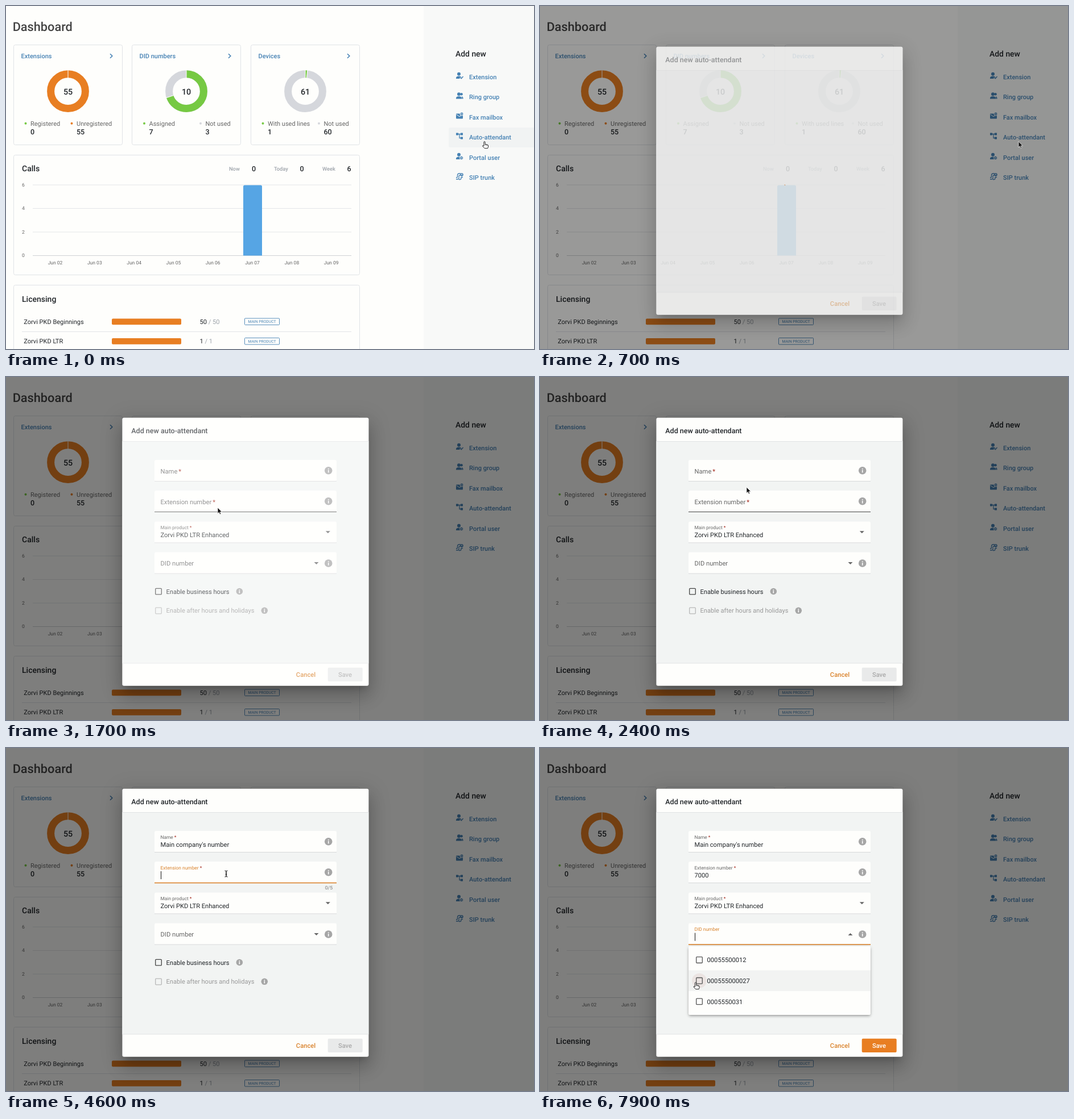
An HTML page for the animation above (8000 ms loop, 928x604 px).

```html
<!DOCTYPE html>
<html lang="en">
<head>
<meta charset="utf-8">
<title>Dashboard</title>
<style>
  html, body { margin: 0; width: 100%; height: 100%; overflow: hidden; background: #fefefc; }
  svg { display: block; width: 928px; height: 604px; font-family: Roboto, sans-serif; text-rendering: geometricPrecision; }
</style>
</head>
<body>
<svg id="stage" viewBox="0 0 928 604"></svg>
<script>
const LOOP = 8000, TICK = 100;
const INK = '#212529', GREY = '#666', PALE = '#9da3aa', BLUE = '#4682b4', PAPER = '#fefefc', SIDE = '#f8f9f8';
const ORANGE = '#e87e22', ACCENT = '#d9822b', GREEN = '#76c943', SILVER = '#d5d7dc', BORDER = '#e0e3e7';

const stage = document.getElementById('stage');
const pen = document.createElement('canvas').getContext('2d');
const clamp = v => Math.max(0, Math.min(1, v));

// Piecewise linear value from [time, value] pairs
function track(t, keys) {
  if (t <= keys[0][0]) return keys[0][1];
  for (let i = 1; i < keys.length; i++) {
    const [t0, a] = keys[i - 1], [t1, b] = keys[i];
    if (t < t1) return a + (b - a) * (t - t0) / (t1 - t0);
  }
  return keys.at(-1)[1];
}

const text = (x, y, str, size, fill = INK, weight = 400, anchor = 'start') =>
  `<text x="${x}" y="${y}" font-size="${size}" fill="${fill}" font-weight="${weight}" text-anchor="${anchor}">${str}</text>`;
const rect = (x, y, w, h, fill, r = 0, extra = '') =>
  `<rect x="${x}" y="${y}" width="${w}" height="${h}" rx="${r}" fill="${fill}" ${extra}/>`;
const circle = (x, y, r, fill, extra = '') =>
  `<circle cx="${x}" cy="${y}" r="${r}" fill="${fill}" ${extra}/>`;
const path = (d, stroke, width = 1, fill = 'none') =>
  `<path d="${d}" fill="${fill}" stroke="${stroke}" stroke-width="${width}"/>`;
const shape = (d, fill) => path(d, 'none', 0, fill);
const at = (x, y, content) => `<g transform="translate(${x} ${y})">${content}</g>`;
const panel = (x, y, w, h) => rect(x + .5, y + .5, w - 1, h - 1, PAPER, 3, `stroke="${BORDER}"`);

// Layers are [offset, blur, spread, alpha]
const shadow = (x, y, w, h, layers) => layers.map(([dy, blur, spread, alpha]) =>
  rect(x - spread, y + dy - spread, w + 2 * spread, h + 2 * spread, '#000', 3,
    `opacity="${alpha}" style="filter:blur(${blur}px)"`)).join('');

// ---- dashboard ----
function donut(x, y, share, color, rest, total) {
  const cut = deg => `<path d="M0-23V-38" stroke="#fff" transform="rotate(${deg})"/>`;
  return at(x, y,
    circle(0, 0, 30.4, 'none', `stroke="${rest}" stroke-width="13"`) +
    circle(0, 0, 30.4, 'none', `stroke="${color}" stroke-width="13" pathLength="100" stroke-dasharray="${share * 100} 100" transform="rotate(-90)"`) +
    cut(0) + (share ? cut(share * 360) : '') + text(0, 5.5, total, 14.3, INK, 500, 'middle'));
}

function card(x, title, total, share, color, rest, legend) {
  return panel(x, 68, 192, 177) + text(x + 13.5, 92, title, 11, BLUE, 500) +
    path(`M${x + 170} 84.2l3.8 3.8l-3.8 3.8`, BLUE, 1.6) +
    donut(x + 96, 150.2, share, color, rest, total) +
    legend.map(([dx, label, value, dot]) =>
      circle(x + dx - 8.5, 206.7, 2, dot) +
      text(x + dx, 211, label, 11, GREY) + text(x + dx, 225.7, value, 12.5, INK, 500)).join('');
}

function calls() {
  let s = panel(13, 262, 609, 212) + text(28, 291, 'Calls', 14, INK, 500);
  [['Now', 392, 0, 432], ['Today', 471, 0, 516.5], ['Week', 556, 6, 599.5]].forEach(([label, x, value, vx]) =>
    s += text(x, 290, label, 9.3, PALE, 500) + text(vx, 290.7, value, 12.5, INK, 500));
  for (let i = 0; i < 4; i++) {
    const y = 315 + i * 41.5;
    s += text(28, y + 2.8, 6 - 2 * i, 8.6, GREY) + path(`M47 ${y}H607`, i < 3 ? '#e4e6e8' : '#cfd2d5');
  }
  s += shape('M417 439.5V318q0-2.5 2.5-2.5h28q2.5 0 2.5 2.5V439.5z', '#56a5e4');
  for (let i = 0; i < 8; i++) s += text(86.5 + i * 69.3, 454.5, 'Jun 0' + (i + 2), 8.5, GREY, 400, 'middle');
  return s;
}

function licensing() {
  const row = (y, name, count) =>
    text(31.3, y + 4, name, 11, INK) + rect(186, y - 5, 122, 10.7, ORANGE, 2) +
    text(340.5, y + 4, `${count} <tspan fill="${PALE}">/ ${count}</tspan>`, 11.1) +
    rect(419.5, y - 5.5, 61, 11.5, 'none', 1, `stroke="${BLUE}" stroke-width=".9"`) +
    text(450, y + 2.5, 'MAIN PRODUCT', 6.8, BLUE, 400, 'middle');
  return panel(13, 491, 609, 130) + text(28, 521, 'Licensing', 14, INK, 500) +
    row(555.5, 'Zorvi PKD Beginnings', 50) + path('M28 573.5H607', '#e2e4e8') + row(590, 'Zorvi PKD LTR', 1);
}

const person = circle(-1, -2.8, 3, BLUE) + shape('M-6 5.5V4.2C-6 1.5-3 .9-1 .9S4 1.5 4 4.2V5.5z', BLUE);
const badge = (x, y) => circle(x, y, 3, BLUE, `stroke="${SIDE}"`) + path(`M${x - 1.5} ${y}h3`, SIDE);
const boxes = list => list.map(([x, y]) => rect(x, y, 4, 4, BLUE)).join('');
const icons = [
  person + path('M1 3.5l2 2l4-5', SIDE, 2.6) + path('M1.5 3.5l1.8 1.8L6.5 1.5', BLUE, 1.4),
  person + circle(3.6, -2.8, 2.2, BLUE) + shape('M4 1q3 1 2.5 4.5h-2z', BLUE),
  rect(-6, -4, 12, 9, BLUE, 1) + path('M-5.5-2.5L0 1.2L5.5-2.5', SIDE) + badge(4, -3.5),
  boxes([[-6, -5.5], [2, -5.5], [2, 1.5]]) + path('M-2-3.5H2M0-3.5V3.5H2', BLUE, 1.3),
  person + badge(3.5, 3),
  path('M-6 5h3q2 0 2-2v-3q0-2 2-2h5M-6 2h1.5q1 0 1-1v-3q0-3 3-3H2M-1 5.5h2q2 0 2-2.5V1.5H6', BLUE, 1.3) +
    circle(4, -3, 2, 'none', `stroke="${BLUE}" stroke-width="1.5"`)
];

function sidebar(hovered) {
  const items = ['Extension', 'Ring group', 'Fax mailbox', 'Auto-attendant', 'Portal user', 'SIP trunk'];
  return rect(734, 0, 194, 604, SIDE) + (hovered ? rect(778, 214, 160, 35, '#f1f3f3', 3) : '') +
    text(790, 88.7, 'Add new', 13.9, INK, 500) +
    items.map((label, i) => {
      const y = 122.5 + i * 35.5;
      return at(797, y, icons[i]) + text(814, y + 6.4, label, 11, BLUE, 500);
    }).join('');
}

const dashboard = text(11.7, 44.3, 'Dashboard', 21.7, '#444', 500) +
  card(13, 'Extensions', 55, 0, GREEN, ORANGE, [[30, 'Registered', 0, GREEN], [111, 'Unregistered', 55, ORANGE]]) +
  card(221, 'DID numbers', 10, .7, GREEN, SILVER, [[30.5, 'Assigned', 7, GREEN], [129.5, 'Not used', 3, SILVER]]) +
  card(430, 'Devices', 61, 1 / 61, GREEN, SILVER, [[30, 'With used lines', 1, GREEN], [128.5, 'Not used', 60, SILVER]]) +
  calls() + licensing();

// ---- pointer ----
const route = [[800, 841, 238.5], [900, 800, 237], [1400, 372, 230], [2200, 372, 230], [2400, 363, 194],
  [2800, 366, 168], [3500, 366, 168], [3800, 387, 221.5], [5900, 387, 221.5], [6300, 519, 344],
  [6600, 545, 333], [7000, 545, 333], [7700, 278, 408], [7900, 273.5, 412.5]];
const pointerAt = t => [1, 2].map(axis => track(t, route.map(key => [key[0], key[axis]])));

const cursors = {
  hand: path('M-1.1 8V1.3a1.1 1.1 0 0 1 2.2 0V5l4.2.8q1.2.3 1.2 1.6v2.2l-.9 2.6H.2L-3.4 8.3q-.3-1.3.9-1.1z', '#111', .9, '#fff') +
    path('M1.1 5v2M3.2 5.5v1.7M5 6v1.5', '#111', .6),
  arrow: path('M0 0V10.5l2.4-2.2l1.6 3.6l1.8-.8l-1.6-3.4h3.3z', '#fff', .7, '#111'),
  beam: path('M-2.5-5.5Q0-5.5 0-4V4q0 1.5-2.5 1.5M2.5-5.5Q0-5.5 0-4V4q0 1.5 2.5 1.5M-1.2 1h2.4', '#111')
};

function pointer(t) {
  const kind = t < 600 || t >= 7600 ? 'hand' : t < 2600 || t >= 6800 ? 'arrow' : 'beam';
  return at(...pointerAt(t), cursors[kind]);
}

// ---- dialog ----
const info = (x, y, r) => circle(x, y, r, '#a6a6a6') +
  rect(x - .8, y - r * .55, 1.6, 1.6, '#fff') + rect(x - .8, y - r * .15, 1.6, r * .7, '#fff');
const checkbox = (x, y, color) => rect(x - 5.3, y - 5.3, 10.6, 10.6, 'none', 1, `stroke="${color}" stroke-width="1.3"`);
const triangle = (x, y, up) => shape(up ? `M${x - 4} ${y + 2}h8l-4-4z` : `M${x - 4} ${y - 2}h8l-4 4z`, GREY);

function field(t, { top, label, value = '', required, focus = [Infinity, Infinity], caret }) {
  const [from, to] = focus, focused = t >= from && t < to;
  const raised = value && from === Infinity ? 1 : clamp((t - from + 50) / 150);
  const [px, py] = pointerAt(t - TICK);
  const hovered = px > 261 && px < 581 && py > top && py < top + 38;
  const star = required ? '<tspan dx="2" fill="#a5281b">*</tspan>' : '';
  let s = rect(261, top, 320, 38, PAPER, 3) +
    (focused ? rect(261, top + 36.7, 320, 1.6, ACCENT) : rect(261, top + 37, 320, 1, hovered ? '#444' : '#d6d8da')) +
    text(271.5, top + 23.7 - 10 * raised, label + star, 11.2 - 2.8 * raised, focused ? ACCENT : GREY) +
    text(271.5, top + 27.8, value, 11.1);
  if (focused && caret) {
    pen.font = '11.1px Roboto, sans-serif';
    s += rect(272 + pen.measureText(value).width, top + 17, 1, 14, '#111');
  }
  return s;
}

function menu(t) {
  const [px, py] = pointerAt(t);
  const rows = ['00055500012', '000555000027', '0005550031'].map((number, i) => {
    const y = 373.2 + i * 36.6, hovered = Math.abs(py - y) < 18.3;
    return (hovered ? rect(261, y - 18.3, 320, 36.6, '#f2f3f2') : '') +
      (hovered && Math.abs(px - 280) < 13 ? circle(280, y, 13, '#ebe4e2') : '') +
      checkbox(280, y, '#555') + text(293.6, y + 4.1, number, 11.15);
  }).join('');
  const box = [261, 349, 320, 121];
  return `<g opacity="${track(t, [[7000, .3], [7200, 1]])}">` +
    shadow(...box, [[1.6, 1.6, -.8, .2], [3.1, 2, 0, .14], [.8, 3.9, 0, .12]]) +
    rect(...box, PAPER, 2) + rows + '</g>';
}

function form(t) {
  const name = "Main company's number".slice(0, Math.ceil(clamp((t - 3000) / 500) * 21));
  const extension = '7000'.slice(0, Math.floor(clamp((t - 4600) / 500) * 4));
  const open = t >= 7000;
  return field(t, { top: 146, label: 'Name', value: name, required: true, focus: [2800, 3800], caret: true }) +
    field(t, { top: 200, label: 'Extension number', value: extension, required: true, focus: [3800, 7000], caret: t >= 4600 && t < 5200 }) +
    field(t, { top: 254.4, label: 'Main product', value: 'Zorvi PKD LTR Enhanced', required: true }) +
    field(t, { top: 308.6, label: 'DID number', focus: [7000, LOOP], caret: true }) +
    (t >= 3800 && !open ? text(574, 249.3, extension.length + '/5', 8.6, '#777', 400, 'end') : '') +
    [164.7, 218.8, 328].map(y => info(566.7, y, 6.8)).join('') +
    triangle(565.8, 273.3) + triangle(545.5, 328, open) +
    checkbox(268, 377.6, '#444') + text(281.5, 381.5, 'Enable business hours', 11.1) + info(410.3, 377.5, 5.8) +
    checkbox(268, 411.5, '#b8b8b8') + text(281.5, 415.3, 'Enable after hours and holidays', 11.1, '#999') + info(454.3, 411.3, 5.8) +
    (open ? menu(t) : '');
}

function spinner(t) {
  const start = 35 + (t - 700) * .2;
  const sweep = track(t, [[800, 1.5], [1000, 12], [1400, 65], [1500, 72]]);
  return circle(421, 308, 11.8, 'none',
    `stroke="${ORANGE}" stroke-width="1.6" pathLength="100" stroke-dasharray="${sweep} 100" transform="rotate(${start} 421 308)"`);
}

function dialog(t) {
  const ready = t >= 4800, loading = t < 1600;
  const veil = track(t, [[1500, .5], [2000, 0]]);
  const box = [204.4, 71.8, 433, 472];
  return `<g opacity="${track(t, [[600, .4], [700, .8], [800, 1]])}">` +
    shadow(...box, [[8.6, 5.9, -5.5, .2], [18.8, 14.9, 2.4, .14], [7, 18, 6.3, .12]]) +
    rect(...box, PAPER, 3) + rect(204.4, 113, 433, 391, '#f2f4f3') +
    path('M204.4 113.5h433M204.4 504h433', '#e1e3e4') +
    text(220.3, 99, 'Add new auto-attendant', 12.5, INK, 500) +
    text(527, 527.7, 'Cancel', 11.2, ACCENT, 500, 'middle') +
    rect(565.7, 511.7, 61, 24.2, ready ? ORANGE : '#e9eaea', 2) +
    text(596, 527.7, 'Save', 11.2, ready ? '#fff' : '#a9a9a9', 500, 'middle') +
    (loading ? '' : form(t)) +
    (veil ? rect(...box, '#fff', 3, `opacity="${veil}"`) : '') +
    (loading ? spinner(t) : '') + '</g>';
}

function scene(t) {
  const shown = t >= 600;
  const shade = track(t, [[600, .2], [700, .4], [800, .5]]);
  return rect(0, 0, 928, 604, PAPER) + dashboard + sidebar(!shown) +
    (shown ? rect(0, 0, 928, 604, '#000', 0, `opacity="${shade}"`) + dialog(t) : '') + pointer(t);
}

let shownTick = -1;
function frame() {
  const tick = Math.floor(performance.now() % LOOP / TICK);
  if (tick !== shownTick) stage.innerHTML = scene((shownTick = tick) * TICK);
  requestAnimationFrame(frame);
}
frame();
</script>
</body>
</html>
```
